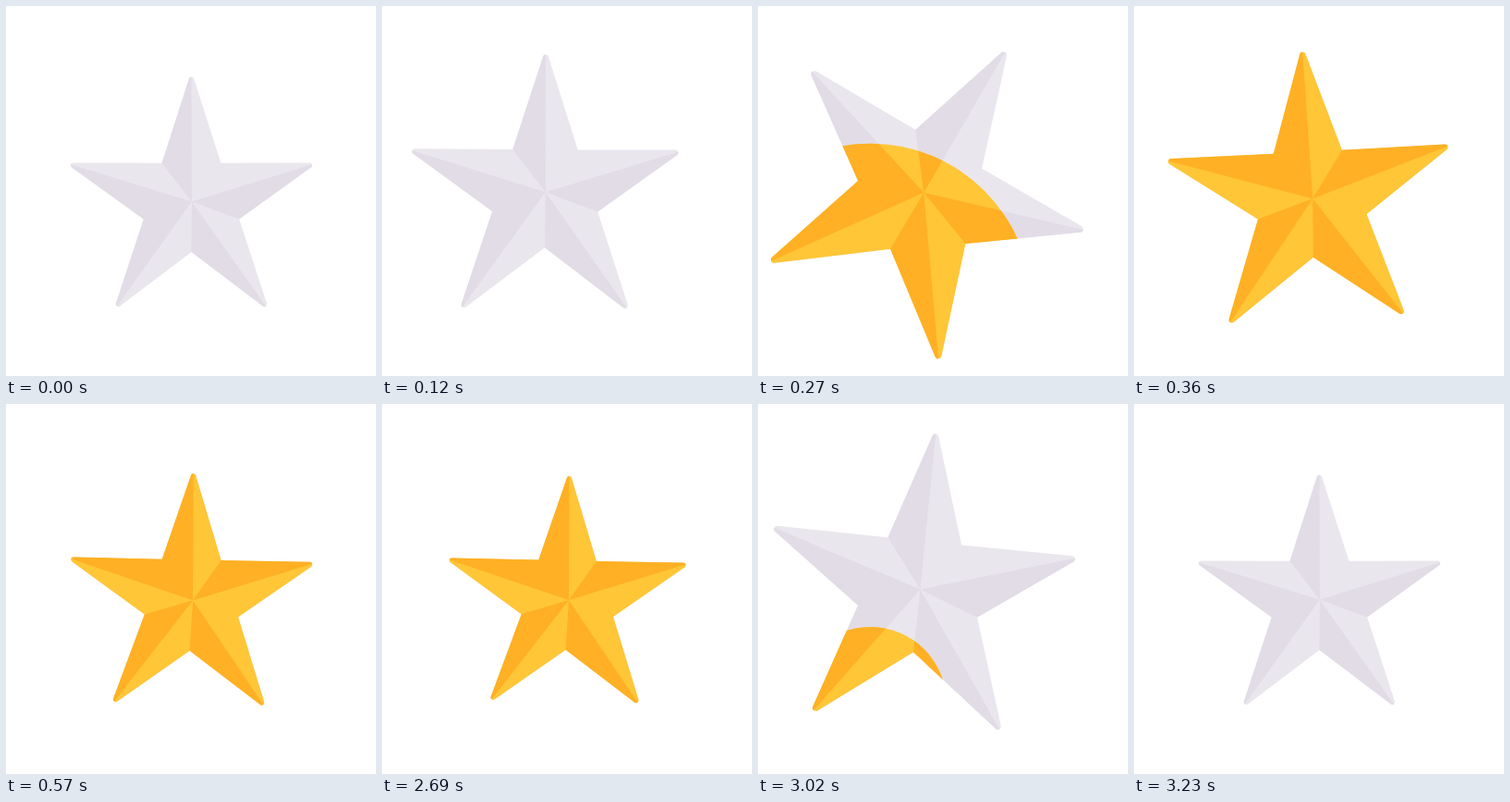
An HTML page with a canvas that plays this animation: 400x400 px, repeating every 4.26 s.

```html
<!DOCTYPE html>
<html lang="en">
<head>
<meta charset="utf-8">
<title>Star toggle</title>
<style>
html, body { margin: 0; height: 100%; overflow: hidden; background: #fff; }
canvas { display: block; }
</style>
</head>
<body>
<canvas width="400" height="400"></canvas>
<script>
const ctx = document.querySelector('canvas').getContext('2d');
const { PI, sin, cos, exp } = Math;
const LOOP = 4260, STEP = 30, TURN = 570, BACK = 3230;
const GRAY = ['#eae6ed', '#e1dce6'], GOLD = ['#ffc637', '#ffb024'];

// Outline points alternate tip, notch, clockwise from the top.
const apex = [0.4, -2.3];
const points = Array.from({ length: 10 }, (_, i) => {
  const r = i % 2 ? (i === 5 ? 52.2 : 54.4) : 143.5;
  const a = i * PI / 5;
  return [r * sin(a), -r * cos(a)];
});
const darkFacets = [2, 4, 6, 7, 9];

const outline = new Path2D();
outline.moveTo(...points[9]);
for (let i = 0; i < 10; i += 2) {
  outline.arcTo(...points[i], ...points[i + 1], 2.8);
  outline.lineTo(...points[i + 1]);
}
outline.closePath();

const shade = new Path2D();
for (const i of darkFacets) {
  shade.moveTo(...apex);
  shade.lineTo(...points[i]);
  shade.lineTo(...points[(i + 1) % 10]);
  shade.closePath();
}

const sigmoid = x => 1 / (1 + exp(-x));

// The star darts up and left, swells, turns one point clockwise and settles back.
function poseAt(u) {
  const p = u / TURN;
  const shift = (1 - exp(-u / 55)) * sigmoid((332 - u) / 40);
  return {
    x: 201 - 27.3 * shift,
    y: 212.7 - 11.5 * shift,
    scale: 1 + 0.294 * sin(PI * p) ** 4 + 0.063 * sin(2 * PI * p),
    angle: 73.2 * sigmoid((u - 280) / 28.6) * PI / 180
  };
}

function drawStar({ x, y, scale, angle }, [light, dark]) {
  ctx.save();
  ctx.translate(x, y);
  ctx.rotate(angle);
  ctx.scale(scale, scale);
  ctx.translate(-0.6, 1.1);
  ctx.clip(outline);
  ctx.fillStyle = light;
  ctx.fillRect(-150, -150, 300, 300);
  ctx.fillStyle = dark;
  ctx.fill(shade);
  ctx.restore();
}

function draw(now) {
  const t = now % LOOP;
  const forward = Math.floor(t / STEP) * STEP;
  const backward = Math.ceil((BACK - t) / STEP) * STEP;
  const u = Math.max(0, Math.min(forward, TURN, backward));
  const pose = poseAt(u);
  ctx.fillStyle = '#fff';
  ctx.fillRect(0, 0, 400, 400);
  drawStar(pose, GRAY);

  // Gold spreads in a circle from the lower left tip.
  ctx.save();
  ctx.beginPath();
  ctx.arc(121.5, 323, 82 * (u / 210) ** 3, 0, 2 * PI);
  ctx.clip();
  drawStar(pose, GOLD);
  ctx.restore();
}

const start = performance.now();
function tick() {
  draw(performance.now() - start);
  requestAnimationFrame(tick);
}
tick();
</script>
</body>
</html>
```
